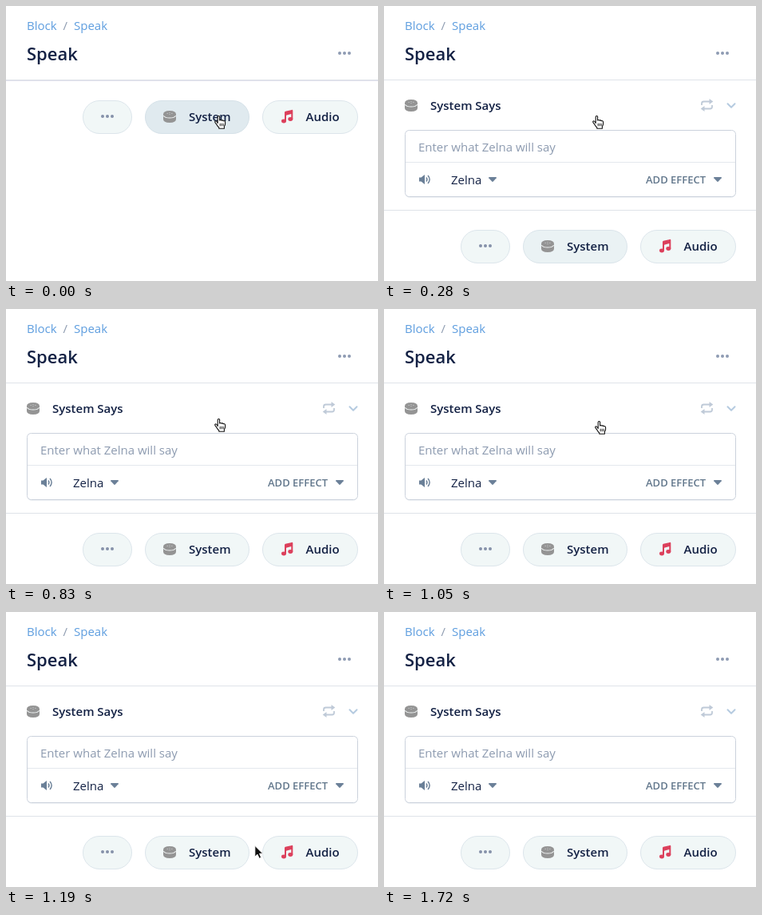
An HTML page for the animation above (2030 ms loop, 466x344 px).

```html
<!DOCTYPE html>
<html lang="en">
<head>
<meta charset="utf-8">
<title>Speak block</title>
<style>
  html, body { margin: 0; width: 100%; height: 100%; overflow: hidden; background: #fff; }
  svg { display: block; width: 466px; height: 344px; }
  text { font: 15px "Open Sans", "Noto Sans", sans-serif; fill: #132144; }
  .b { font-weight: 600; }
  .link { fill: #5d9df0; fill: #5d9ddf; }
  .hint { fill: #8d9bb0; }
  .rule { fill: #dfe3e9; }
  .pill { fill: #f1f7f7; stroke: #dce5eb; }
  .slate { fill: #6b8098; }

  .first, .panel, .buttons, .system, .cursor { animation: 2030ms step-end infinite; }
  .first { animation-name: first; }
  .panel { animation-name: panel; }
  .buttons { animation-name: drop; }
  .system { animation-name: hover; }
  .hand { animation-name: hand; }
  .beam { animation-name: beam; }
  .arrow { animation-name: arrow; }

  @keyframes first { 0% { opacity: 1 } 13.79%, 100% { opacity: 0 } }
  @keyframes panel { 0% { opacity: 0 } 13.79%, 100% { opacity: 1 } }
  @keyframes drop {
    0% { transform: none }
    13.79%, 100% { transform: translateY(162px) }
  }
  @keyframes hover {
    0% { fill: #e0eaef; stroke: #d5e1e8 }
    13.79% { fill: #eaf2f4; stroke: #dae4ea }
    24.13%, 100% { fill: #f1f7f7; stroke: #dce5eb }
  }
  @keyframes hand {
    0% { transform: translate(261px, 137px); opacity: 1 }
    51.72% { transform: translate(264px, 140px); opacity: 1 }
    55.17%, 100% { opacity: 0 }
  }
  @keyframes beam { 0% { opacity: 0 } 55.17% { opacity: 1 } 58.62%, 100% { opacity: 0 } }
  @keyframes arrow { 0% { opacity: 0 } 58.62% { opacity: 1 } 62.06%, 100% { opacity: 0 } }
</style>
</head>
<body>
<svg viewBox="0 0 466 344">
  <defs>
    <g id="dots">
      <circle cx="-6" r="2"/><circle r="2"/><circle cx="6" r="2"/>
    </g>
    <g id="puck" fill="#949494">
      <path d="M0 4.6Q0 0 8 0T16 4.6V10.6Q16 15 8 15T0 10.6Z"/>
      <path d="M.3 6.2Q2 9 8 9T15.7 6.2" fill="none" stroke="#f1f5f5" stroke-width="1.1"/>
      <path d="M4.4 3.4H6M7.3 2.4H8.7M10 3.4H11.6M7.3 4.6H8.7" stroke="#c9cccd" stroke-width=".8"/>
    </g>
    <path id="caret" d="M.7 0H9.3Q10.4.2 9.7 1.2L5.8 5.6Q5 6.3 4.2 5.6L.3 1.2Q-.4.2.7 0Z"/>
  </defs>

  <text class="link" x="26" y="30">Block</text>
  <text class="hint" x="71.5" y="30">/</text>
  <text class="link" x="85" y="30">Speak</text>
  <text class="b" x="26" y="68" style="font-size:22px">Speak</text>
  <use href="#dots" x="424" y="59" fill="#8e9bb3"/>
  <rect class="rule" y="92" width="466" height="1"/>
  <rect class="first" y="93" width="466" height="1" fill="#e0e0ec"/>

  <g class="panel">
    <use href="#puck" x="26" y="117"/>
    <text class="b" x="58" y="130">System Says</text>
    <g fill="none" stroke="#bfcad8" stroke-width="1.8" stroke-linejoin="round">
      <path d="M398 124V122Q398 119.5 400.5 119.5H408M411 124V126Q411 128.500 408.500 128.500H401"/>
      <path d="M430.500 122.300L435 126.700L439.500 122.300" stroke="#b5cbe0" stroke-width="2" stroke-linecap="round"/>
    </g>
    <path d="M407.500 116L412.300 119.500L407.500 123ZM401.500 125L396.700 128.500L401.500 132Z" fill="#bfcad8"/>

    <rect x="27" y="157" width="413" height="83" rx="5" fill="#eff2f5"/>
    <rect x="26.500" y="155.500" width="414" height="83" rx="5" fill="#fff" stroke="#cbd2dc"/>
    <rect x="27" y="195" width="413" height="1" fill="#e4e8ed"/>
    <text class="hint" x="43" y="182">Enter what Zelna will say</text>

    <path class="slate" d="M44 214.500H46.500L51 211V223L46.500 219.500H44Z"/>
    <path d="M53 214.500Q55 217 53 219.500M55 212Q59.300 217 55 222" fill="none" stroke="#6b8098" stroke-width="1.400"/>
    <text x="84" y="223">Zelna</text>
    <use class="slate" href="#caret" x="131" y="214"/>
    <text class="b" x="328" y="222" style="font-size:13px;fill:#62778c">ADD EFFECT</text>
    <use class="slate" href="#caret" x="413" y="214"/>
    <rect class="rule" y="255" width="466" height="1"/>
  </g>

  <g class="buttons">
    <rect class="pill" x="96.500" y="118.500" width="61" height="41" rx="20.500"/>
    <use href="#dots" x="127" y="138" fill="#8591a9"/>
    <rect class="pill system" x="174.500" y="118.500" width="130" height="41" rx="20.500"/>
    <use href="#puck" x="197" y="131"/>
    <text class="b" x="229" y="144">System</text>
    <rect class="pill" x="321.500" y="118.500" width="119" height="41" rx="20.500"/>
    <g fill="#dc405c">
      <path d="M349 133.200Q349 132 350 131.700L358 129.900Q359.300 129.700 359.300 131V141.500H357.300V135L351 136.700V144H349Z"/>
      <ellipse cx="348" cy="144" rx="3" ry="2.400"/>
      <ellipse cx="356.300" cy="141.500" rx="3" ry="2.400"/>
    </g>
    <text class="b" x="375.500" y="144">Audio</text>
  </g>

  <g class="cursor hand" stroke="#111" stroke-linejoin="round">
    <path d="M4.200 9.600V1.800Q4.200.5 5.400.5T6.600 1.800V6Q7.800 4.800 9 6.200Q10.300 5.300 11.200 6.700Q13.600 6.200 13.600 8.300V10.500Q13.600 12 12.400 13.500V16.300H5.800V15Q4 13.400 3 11.400Q1.800 9.600.9 8.600Q.3 7.200 1.600 6.800Q2.800 6.800 4.200 9.600Z" fill="#fff" stroke-width="1.100"/>
    <path d="M7.200 9.800V13.200M9.200 9.800V13.200M11.200 9.800V13.200" stroke-width=".9"/>
  </g>
  <g class="cursor beam" fill="none">
    <path d="M288.500 168.500Q291.500 168.500 291.500 171V180Q291.500 182.500 288.500 182.500M294.500 168.500Q291.500 168.500 291.500 171M291.500 180Q291.500 182.500 294.500 182.500M289.500 176.500H293.500" stroke="#222" stroke-width="1.100"/>
  </g>
  <path class="cursor arrow" d="M311.800 292.300V306.300L315 303.300L317.200 308.300L319.700 307.200L317.600 302.300H321.800Z" fill="#111" stroke="#fff" stroke-width="1"/>
</svg>
</body>
</html>
```
